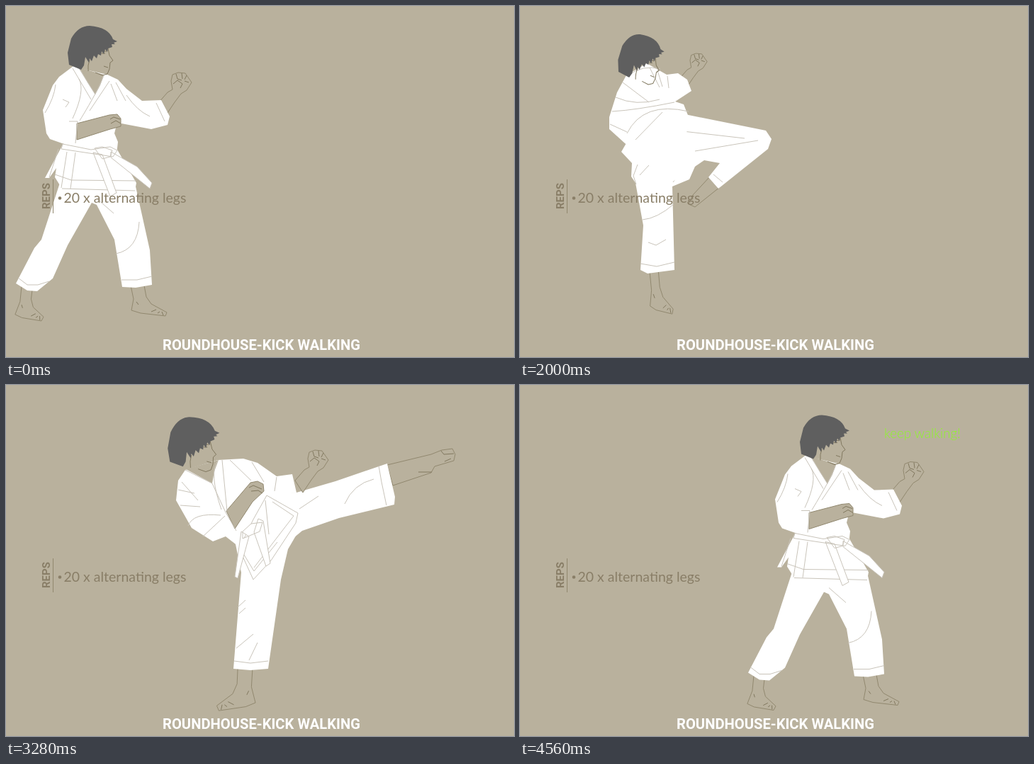
Recreate the animation shown at these times as an HTML page. Size 717 by 496 pixels, loop 5960 ms.

```html
<!DOCTYPE html>
<html lang="en">
<head>
<meta charset="utf-8">
<title>Roundhouse-kick walking</title>
<style>
html, body { margin: 0; width: 100%; height: 100%; overflow: hidden; background: #b9b19d }
svg { display: block; width: 717px; height: 496px }
path { stroke-linejoin: round; vector-effect: non-scaling-stroke }
.w { fill: #fff }
.f { fill: none; stroke: #c9c4ba }
.b { fill: #fff; stroke: #c9c4ba }
.s { fill: #b9b19d; stroke: #91886f }
.n { fill: #b9b19d }
.k { fill: none; stroke: #81785f }
.h { fill: #5f5f5f }
text { font-family: Lato, sans-serif; fill: #897e67 }
.bold { font-family: Roboto, sans-serif; font-weight: 700 }
</style>
</head>
<body>
<svg viewBox="0 0 717 496">
<defs>
<!-- shared parts, drawn from their own top left corner -->
<g id="head">
  <path class="k" d="M57 32 59 42 64 49 60 52 59 61 56 68 49 70 39 66M51 57 57 59M31 48Q28 56 29 64M48 39H53M50 36H55"/>
  <path class="h" d="M2 55 0 38 5 18Q15 0 31 0Q58 2 64 19L70 22 65 24 67 26 62 26 63 30 57 32 56 37 53 33 51 40 48 36 47 42 43 40 41 46 37 42 34 50 31 46 30 52 25 44 23 56 19 62Z"/>
</g>
<g id="arm">
  <path class="s" d="M-18 43-5 28 2 24 0 12 2 3 10 0 20 1 29 14 22 25 14 30 5 42-7 60Z"/>
  <path class="k" d="M7 2 9 9 15 11M15 1 16 9M22 4 19 10M3 16 9 11 16 16 13 22M19 12 25 14"/>
</g>
<g id="foot">
  <path class="s" d="M0 0 4 19 1 35 14 39 49 43 51 38 29 26 22 16 19 0Z"/>
  <path class="k" d="M8 23 11 27M29 37 36 34M38 39 41 37M44 37 46 42"/>
</g>

<g id="guard">
  <use href="#foot" transform="translate(22 396) skewX(-14) scale(.82 1.14)"/>
  <use href="#foot" transform="translate(176 395)"/>
  <use href="#arm" transform="translate(233 94)"/>
  <path class="w" d="M76 250 50 330 40 342 14 392 30 402 44 403 66 385 87 338 121 278 128 281 153 330 164 397 183 398 206 394 203 345 183 255Z"/>
  <path class="f" d="M17 384 30 394 45 394 61 389M163 387 185 387 206 382M188 305Q186 344 155 350M128 272 152 293"/>
  <path class="w" d="M80 196 55 243 61 243 71 229 69 242 79 258 182 261 184 250 157 203Z"/>
  <path class="f" d="M61 242 74 202M78 257 86 206M91 258 98 207M69 238 92 246 184 247M79 258 182 261"/>
  <path class="w" d="M95 85 75 100 66 112 52 147 57 180 62 188 82 195 80 203 156 210 158 192 153 180 155 172 163 166 205 174 228 168 231 156 219 133 192 134 170 117 158 104 143 97 104 88Z"/>
  <path class="n" d="M103 87 138 97 133 112 126 125 115 108Z"/>
  <path class="s" d="M100 166 146 154 157 153 162 159 162 170 147 174 100 189Z"/>
  <path class="k" d="M147 160 152 157 161 160M148 166 155 162 162 166"/>
  <path class="f" d="M103 88 126 125M94 88 120 132M138 98Q132 116 104 162M146 106 118 148M89 163 101 163 98 194M70 111Q68 130 55 151M80 132 89 136 84 143M103 103Q112 120 94 159M148 110 157 134M155 108 169 134M170 126Q185 148 203 156M212 137 224 163"/>
  <path class="b" d="M80 195 120 203 147 199 157 204 151 213 78 202ZM148 206 185 227 206 250 203 258 148 214ZM123 207 147 269 156 264 136 210ZM125 201 136 199 150 204 147 213 136 216Z"/>
  <use href="#head" transform="translate(87 28)"/>
</g>

<g id="liftTop">
  <use href="#arm" transform="translate(245 101) scale(.83)"/>
  <path class="w" d="M156 98 168 92 200 102 222 124 228 135 240 130 251 147 252 158 225 169 216 171 216 200 150 200 138 180 132 165 133 145 148 113Z"/>
  <path class="f" d="M163 102 155 118 161 130 153 155M172 101Q180 122 198 137M203 111 219 139M225 132 227 158M232 136 244 160M140 155 163 150M138 165Q155 172 181 166M188 151 218 162M152 190Q178 182 215 180M153 199Q178 189 216 188"/>
  <use href="#head" transform="translate(148 36)"/>
</g>
<g id="liftLegs">
  <use href="#foot" transform="translate(190 386) skewX(-14) scale(1.1 1.18)"/>
  <path class="w" d="M241 311 244 322 228 392 190 386 191 366 222 322Z"/>
  <path class="s" d="M191 311 222 302 230 292 241 311 205 338 196 364 191 367 188 355Z"/>
  <path class="w" d="M151 195 135 240 130 262 151 262 155 255 190 312 222 302 230 290 272 320 297 283 304 262 302 248 250 215 216 194Z"/>
  <path class="f" d="M191 378 207 382 229 382M237 320 221 348 224 358M152 203 133 260M165 203Q159 240 151 260M177 198 180 236M205 202 253 211 224 215M197 235 252 226 198 238 257 233M166 248Q205 262 260 266M230 287 275 312M298 252 274 298"/>
</g>

<g id="backTop">
  <use href="#arm" transform="translate(226 75) scale(.83)"/>
  <path class="w" d="M136 106 165 89 193 105 209 103 222 112 228 128 205 143 217 147 228 175 200 220 165 230 112 182 112 165 123 130Z"/>
  <path class="f" d="M137 107Q160 90 184 97M169 95 183 123M180 99 187 122M194 107 196 124M131 116 168 144M121 137Q150 150 183 140M116 157Q150 155 204 144M113 175 137 186M137 188Q160 142 224 157M149 197 187 158"/>
  <use href="#head" transform="translate(127 46) rotate(4) scale(.92 1)"/>
</g>
<g id="backStand">
  <use href="#foot" transform="translate(175 375) scale(.65 1.4)"/>
  <path class="w" d="M135 206 150 222 149 241 155 250 166 310 162 373 172 378 210 373 207 255 231 245 252 197 215 165 150 180Z"/>
  <path class="f" d="M162 364 185 368 210 362M158 224 152 240 156 252M161 239 185 213M209 280Q186 300 165 302M173 334 184 338 198 330M208 249 237 208"/>
</g>
<g id="backKick">
  <path class="s" d="M375 127 412 128 440 115 455 112 470 115 473 122 465 132 415 143 382 155Z"/>
  <path class="k" d="M411 131 416 141 449 122 466 118M461 113 462 128"/>
  <path class="w" d="M195 150 217 147 260 146 310 139 376 122 384 158 381 181 310 184 254 197 200 220Z"/>
  <path class="f" d="M364 126 371 181M376 122 380 180M312 139Q300 167 246 196M237 169 271 160"/>
</g>
<g id="backBent">
  <path class="s" d="M270 264 235 292 226 288 232 275 257 248Z"/>
  <path class="w" d="M190 150 216 160 335 184 343 196 338 210 268 266 254 250 270 230 248 226 205 255 165 230Z"/>
  <path class="f" d="M218 185 305 195M235 213 324 198M261 246 274 257"/>
</g>

<g id="stepTop">
  <use href="#arm" transform="translate(361 91) scale(.87)"/>
  <path class="w" d="M255 70 268 69 298 90 308 100 310 117 318 122 322 134 338 127 348 152 346 165 322 174 306 170 309 185 305 196 236 188 238 178 226 172 220 160 219 135 228 106 238 88Z"/>
  <path class="f" d="M258 72 292 85M266 84Q278 94 276 115M272 87 278 126M283 90 303 122M246 92 249 124M221 139 241 120M222 160 239 149 252 155 233 164M255 165 292 151M309 116 317 162M332 131 340 169M247 173Q270 180 300 171"/>
  <path class="b" d="M236 178 309 187 306 197 236 188ZM303 195 322 210 344 248 341 256 303 206Z"/>
  <use href="#head" transform="translate(247 15)"/>
</g>
<g id="stepLegs">
  <use href="#foot" transform="translate(188 391) skewX(-14) scale(1.1 1.03)"/>
  <use href="#foot" transform="translate(318 403) scale(1.37 1.1)"/>
  <path class="w" d="M226 230 226 262 205 335 186 388 215 403 240 363 268 287 292 325 318 405 354 395 351 320 318 230Z"/>
  <path class="w" d="M236 187 205 243 258 243 290 238 322 250 306 195Z"/>
  <path class="f" d="M189 379 221 393M315 398 354 387M206 243 258 243 260 220 268 192M238 191 218 222M248 191 226 244M270 193 288 228M286 195 310 240M297 197 321 249M229 248 250 255M262 249 267 287M215 323 202 362 210 370M299 326 321 328M302 347 333 341 322 360 306 361M348 352 318 392"/>
</g>

<g id="frontStand">
  <use href="#foot" transform="translate(348 400) skewX(6) scale(-1.1 1.4)"/>
  <path class="w" d="M322 215 332 265 321 401 345 403 370 401 388 275 398 232 412 208 380 170Z"/>
  <path class="f" d="M322 390 345 393 370 390M327 314 338 304M329 323 338 315M325 372 349 352M343 389 355 364"/>
</g>
<g id="frontKick">
  <path class="s" d="M538 113 600 98 615 92 630 90 634 98 632 107 605 115 600 124 546 142Z"/>
  <path class="k" d="M582 123 601 123M614 93 618 98 632 97M619 108 628 104"/>
  <path class="w" d="M365 153 410 152 465 136 538 111 549 158 548 169 470 188 418 206 406 216 370 225Z"/>
  <path class="f" d="M526 114 530 137 537 170M414 175 441 157M478 168Q490 140 519 133"/>
</g>
<g id="frontBent">
  <path class="s" d="M442 250 425 282 410 290 400 286 418 238Z"/>
  <path class="w" d="M340 210 365 155 400 160 475 150 485 158 484 172 441 253 414 240 430 205 405 214 385 250 335 245Z"/>
  <path class="f" d="M417 231 444 243M410 178 471 168M474 165 438 213"/>
</g>
<g id="frontTop">
  <use href="#arm" transform="translate(426 92)"/>
  <path class="w" d="M253 120 243 135 240 163 262 202 292 221 310 214 328 228 380 215 396 170 384 155 410 152 404 126 382 129 355 110 335 104 299 106Z"/>
  <path class="n" d="M254 119 291 139 294 122 300 106Z"/>
  <path class="s" d="M311 178 345 138 355 136 363 140 364 150 348 165 323 203Z"/>
  <path class="k" d="M343 145 349 142 361 147M346 150 356 149 362 153"/>
  <path class="f" d="M253 120 291 139 310 180 325 206M299 107Q286 124 304 176M305 106 312 178M248 137 271 163M243 148 266 153M246 170 274 172M257 199Q264 180 303 184M278 214 309 185M316 106 346 135M347 109 364 137M382 130 379 150"/>
  <path class="b" d="M368 156 412 181 409 195 374 248 349 275 329 231 349 190Z"/>
  <path class="f" d="M376 165 406 185 350 258M366 163 371 211M333 235 350 263 383 222"/>
  <path class="b" d="M332 207 323 271 327 273 343 214ZM356 189 363 192 373 252 367 256 350 208ZM334 207 346 196 362 194 358 207 334 217Z"/>
  <use href="#head" transform="translate(226 47) rotate(-3) scale(1.06 1.12)"/>
</g>
</defs>

<g id="figure"></g>

<text class="bold" font-size="15" transform="translate(61.5 287) rotate(-90)">REPS</text>
<path d="M66.5 245V293" stroke="#91886f"/>
<circle cx="76" cy="271.5" r="2.3" fill="#897e67"/>
<text x="81.5" y="278" font-size="19.5">20 x alternating legs</text>
<text class="bold" x="360.5" y="486" font-size="20.2" text-anchor="middle" style="fill:#fff">ROUNDHOUSE-KICK WALKING</text>
<text id="cheer" x="514" y="75" font-size="18.7" style="fill:#8ff62b;font-weight:300">keep walking!</text>
</svg>

<script>
const LOOP = 5960;
const figure = document.getElementById('figure');
const cheer = document.getElementById('cheer');

// start time, then parts as "id dx dy angle"
const scenes = [
  [0, 'guard'],
  [1200, 'liftLegs', 'liftTop'],
  [1360, 'backStand 4 -6', 'backBent 0 8', 'liftTop -3 -7'],
  [1520, 'backStand 2 -6', 'backBent 0 -16', 'backTop 5 -14'],
  [1680, 'backStand', 'backKick', 'backTop'],
  [2000, 'backStand 8', 'backBent 12 -8', 'backTop 14 -8'],
  [2120, 'liftLegs 50 2', 'liftTop 50 -10'],
  [2240, 'stepLegs', 'stepTop'],
  [2800, 'frontStand -10 -8', 'frontBent -38 30', 'stepTop 28'],
  [2960, 'frontStand', 'frontBent', 'frontTop 20 -12'],
  [3120, 'frontStand 0 -1', 'frontBent 8 6 -16', 'frontTop 14 -12'],
  [3280, 'frontStand', 'frontKick', 'frontTop'],
  [3520, 'frontStand 2 -1', 'frontBent 10 4 -10', 'frontTop 14 -8'],
  [3640, 'frontStand 20', 'frontBent 30 26', 'frontTop 48 -8'],
  [3760, 'guard 308 14.5']
];

function place(part) {
  const [id, x = 0, y = 0, angle = 0] = part.split(' ');
  return `<use href="#${id}" transform="translate(${x} ${y}) rotate(${angle} 370 190)"/>`;
}

let shown;
function draw(t) {
  const scene = scenes.findLast(s => s[0] <= t);
  if (scene !== shown) {
    figure.innerHTML = scene.slice(1).map(place).join('');
    shown = scene;
  }
  const step = Math.floor((t - 4200) / 120) + 1;
  cheer.setAttribute('opacity', Math.min(1, Math.max(0, step / 4)));
}

const start = performance.now();
function tick() {
  draw((performance.now() - start) % LOOP);
  requestAnimationFrame(tick);
}
tick();
</script>
</body>
</html>
```
